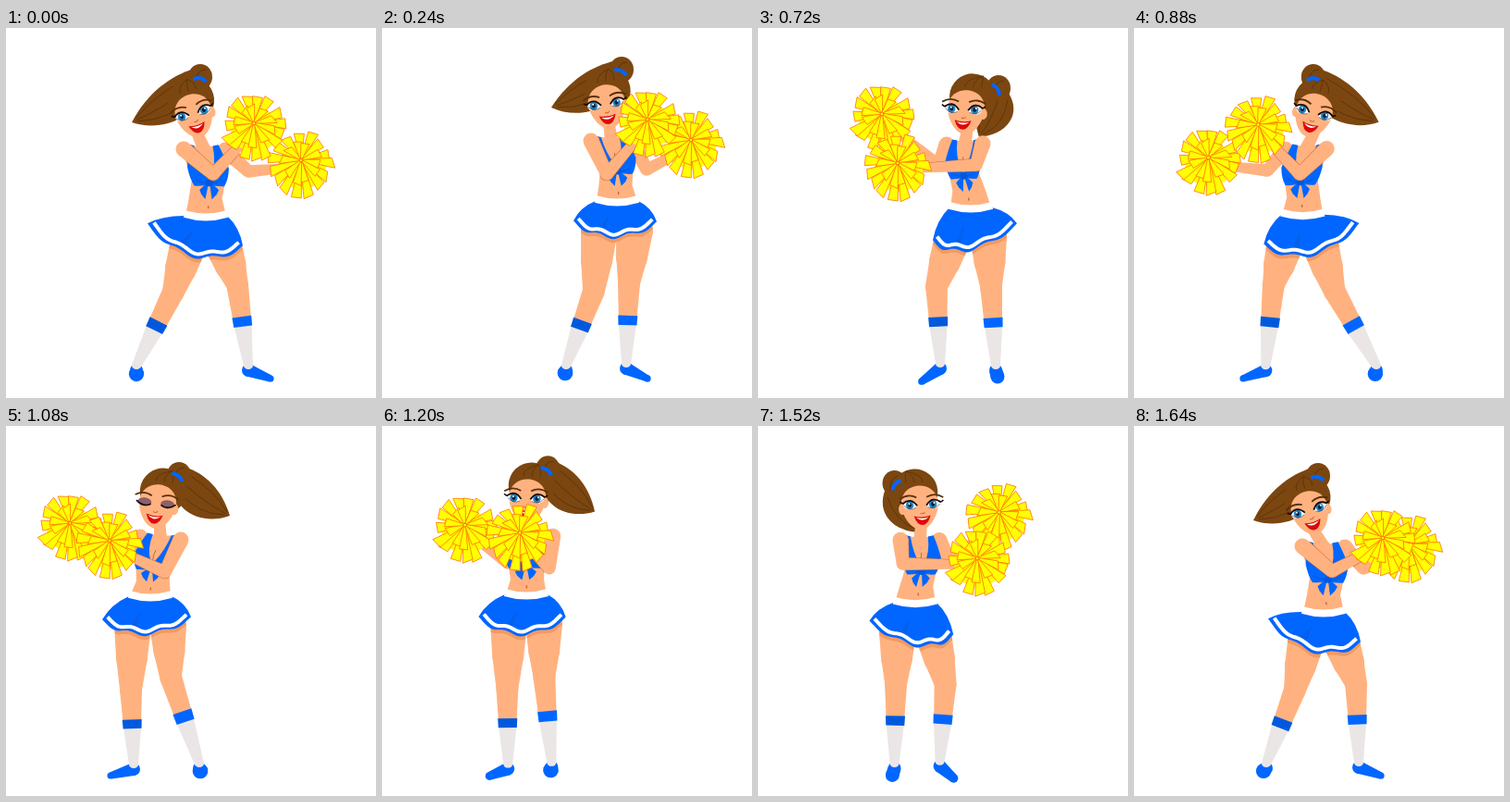
Write an HTML page with a canvas that moves like this. It is 400x400 px and loops after 1680 ms.

```html
<!DOCTYPE html>
<html lang="en">
<head>
<meta charset="utf-8">
<title>Cheerleader</title>
<style>
html, body { margin: 0; width: 100%; height: 100%; overflow: hidden; background: #fff; }
canvas { display: block; width: 100vw; height: 100vh; }
</style>
</head>
<body>
<canvas id="stage" width="400" height="400"></canvas>
<script>
const ctx = document.getElementById('stage').getContext('2d');
const LOOP = 1680, STEP = 40, MIRROR = 406;
const SKIN = '#ffb27f', SHADE = '#f29a62', LINE = '#c9683a', BLUE = '#0066ff', NAVY = '#0059dd';
const HAIR = '#7b4610', DARK_HAIR = '#58300a', SOCK = '#ebe6e6', YELLOW = '#ffff00', ORANGE = '#ff7000';
const keys = [];

// The second half of the dance mirrors the first, so a pose may serve twice.
function addPose(time, tilt, parts, mirrorTime) {
  keys.push({ time, parts: { ...parts, tilt: [tilt, 0] } });
  if (mirrorTime === undefined) return;
  const flipped = { tilt: [-tilt, 0] };
  for (const [name, [x, y]] of Object.entries(parts)) {
    flipped[name.replace(/[LR]$/, c => c === 'L' ? 'R' : 'L')] = [MIRROR - x, y];
  }
  keys.push({ time: mirrorTime, parts: flipped });
}

addPose(0, -17, {
  face: [203, 92], bun: [210, 53], tip: [136, 102], shL: [192, 131], shR: [237, 132],
  elL: [224, 158], elR: [262, 155], pomL: [269, 110], pomR: [320, 150],
  band: [216, 203], hemL: [153, 213], hemM: [204, 247], hemR: [256, 237],
  kneeL: [181, 285], kneeR: [250, 277], ankL: [141, 365], ankR: [262, 365], toeL: [141, 374], toeR: [286, 379]
}, 840);
addPose(240, -9, {
  face: [243, 82], bun: [259, 45], tip: [183, 86], shL: [226, 122], shR: [270, 122],
  elL: [243, 158], elR: [286, 153], pomL: [288, 106], pomR: [335, 128],
  band: [254, 187], hemL: [207, 210], hemM: [250, 226], hemR: [297, 211],
  kneeL: [229, 284], kneeR: [267, 276], ankL: [199, 365], ankR: [264, 363], toeL: [198, 373], toeR: [287, 379]
});
addPose(520, -3, {
  face: [255, 75], bun: [280, 55], tip: [230, 101], shL: [233, 118], shR: [286, 117],
  elL: [211, 152], elR: [284, 152], pomL: [192, 107], pomR: [255, 111],
  band: [259, 183], hemL: [215, 211], hemM: [258, 228], hemR: [303, 211],
  kneeL: [237, 280], kneeR: [270, 275], ankL: [241, 364], ankR: [263, 364], toeL: [245, 374], toeR: [280, 381]
});
addPose(720, 3, {
  face: [225, 88], bun: [260, 65], tip: [239, 118], shL: [204, 126], shR: [243, 125],
  elL: [195, 148], elR: [236, 148], pomL: [135, 100], pomR: [152, 153],
  band: [230, 194], hemL: [189, 231], hemM: [228, 240], hemR: [280, 213],
  kneeL: [193, 279], kneeR: [252, 279], ankL: [197, 363], ankR: [257, 365], toeL: [177, 382], toeR: [259, 377]
}, 1560);
addPose(1080, 7, {
  face: [164, 84], bun: [187, 53], tip: [242, 97], shL: [145, 120], shR: [189, 123],
  elL: [145, 142], elR: [172, 158], pomL: [70, 112], pomR: [113, 131],
  band: [156, 184], hemL: [104, 211], hemM: [150, 225], hemR: [200, 208],
  kneeL: [135, 285], kneeR: [178, 271], ankL: [138, 366], ankR: [209, 365], toeL: [113, 378], toeR: [210, 373]
});
addPose(1360, -2, {
  face: [153, 73], bun: [166, 36], tip: [212, 88], shL: [127, 119], shR: [182, 116],
  elL: [122, 157], elR: [200, 147], pomL: [150, 122], pomR: [228, 106],
  band: [156, 181], hemL: [106, 206], hemM: [150, 227], hemR: [198, 209],
  kneeL: [137, 280], kneeR: [174, 272], ankL: [135, 365], ankR: [163, 362], toeL: [126, 379], toeR: [160, 371]
});
addPose(1640, -17, {
  face: [190, 91], bun: [199, 54], tip: [129, 102], shL: [182, 130], shR: [228, 131],
  elL: [214, 157], elR: [248, 154], pomL: [270, 128], pomR: [298, 135],
  band: [205, 201], hemL: [145, 210], hemM: [195, 244], hemR: [245, 235],
  kneeL: [174, 285], kneeR: [240, 278], ankL: [143, 365], ankR: [243, 364], toeL: [140, 373], toeR: [267, 378]
}, 800);
keys.sort((a, b) => a.time - b.time);

// Smooth periodic interpolation that never overshoots a key.
function poseAt(time) {
  const n = keys.length;
  const key = i => keys[(i + n) % n];
  const when = i => key(i).time + Math.floor(i / n) * LOOP;
  let i = n - 1;
  while (keys[i].time > time) i--;
  const h = when(i + 1) - when(i), s = (time - when(i)) / h;
  const pose = {};
  for (const name of Object.keys(keys[0].parts)) {
    pose[name] = [0, 1].map(axis => {
      const value = j => key(j).parts[name][axis];
      const slope = j => (value(j + 1) - value(j)) / (when(j + 1) - when(j));
      const tangent = j => {
        const a = slope(j - 1), b = slope(j);
        return a * b <= 0 ? 0 : 2 * a * b / (a + b);
      };
      const a = value(i), d = value(i + 1) - a;
      return a + d * s * s * (3 - 2 * s)
        + h * s * (1 - s) * (tangent(i) * (1 - s) - tangent(i + 1) * s);
    });
  }
  return pose;
}

const mix = (a, b, k) => [a[0] + (b[0] - a[0]) * k, a[1] + (b[1] - a[1]) * k];
const shift = (p, x, y) => [p[0] + x, p[1] + y];
const distance = (a, b) => Math.hypot(b[0] - a[0], b[1] - a[1]);

function paint(fill, stroke, width = 1) {
  if (fill) { ctx.fillStyle = fill; ctx.fill(); }
  if (stroke) { ctx.strokeStyle = stroke; ctx.lineWidth = width; ctx.stroke(); }
}
function shape(points, fill, stroke, width) {
  ctx.beginPath();
  points.forEach(p => ctx.lineTo(...p));
  ctx.closePath();
  paint(fill, stroke, width);
}
function oval(x, y, rx, ry, fill, stroke, width) {
  ctx.beginPath();
  ctx.ellipse(x, y, rx, ry, 0, 0, 7);
  paint(fill, stroke, width);
}
function curve(x0, y0, cx, cy, x1, y1, color, width) {
  ctx.beginPath();
  ctx.moveTo(x0, y0);
  ctx.quadraticCurveTo(cx, cy, x1, y1);
  paint(null, color, width);
}
function taper(a, b, wa, wb, color) {
  const len = distance(a, b) || 1;
  const nx = (a[1] - b[1]) / len / 2, ny = (b[0] - a[0]) / len / 2;
  shape([shift(a, nx * wa, ny * wa), shift(b, nx * wb, ny * wb),
    shift(b, -nx * wb, -ny * wb), shift(a, -nx * wa, -ny * wa)], color);
}
function limb(points, widths, color) {
  points.forEach((p, i) => {
    oval(p[0], p[1], widths[i] / 2, widths[i] / 2, color);
    if (i) taper(points[i - 1], p, widths[i - 1], widths[i], color);
  });
}
// Draws only on top of what is already painted.
function inside(draw) {
  ctx.globalCompositeOperation = 'source-atop';
  draw();
  ctx.globalCompositeOperation = 'source-over';
}

function leg(p, side) {
  const hip = shift(p.band, side === 'L' ? -19 : 19, 32);
  const knee = p['knee' + side], ankle = p['ank' + side], toe = p['toe' + side];
  const heel = shift(ankle, 0, 5);
  const top = mix(knee, ankle, .4), cuff = mix(knee, ankle, .52);
  limb([hip, mix(hip, knee, .5), knee, top], [40, 34, 24, 20], SKIN);
  limb([heel, toe], [14, Math.max(7, 18 - distance(heel, toe) * .42)], BLUE);
  taper(cuff, ankle, 19, 10, SOCK);
  oval(ankle[0], ankle[1], 5, 4, SOCK);
  taper(top, cuff, 21, 20, side === 'L' ? NAVY : BLUE);
}

function hemLine(p, scale) {
  const { band, hemL, hemM, hemR } = p;
  const control = axis => 2 * hemM[axis] - (hemL[axis] + hemR[axis]) / 2;
  const hem = [];
  for (let i = 0; i <= 40; i++) {
    const k = i / 40, wave = Math.cos((k - .14) / .36 * Math.PI * 2) * 2.2;
    const [x, y] = [0, 1].map(a => (1 - k) ** 2 * hemL[a] + 2 * k * (1 - k) * control(a) + k * k * hemR[a]);
    hem.push(mix(band, [x, y + wave], scale));
  }
  return hem;
}
function skirt(p) {
  const { band } = p, hem = hemLine(p, 1), stripe = hemLine(p, .89);
  const left = shift(band, -23, 0), right = shift(band, 23, 0);
  const outline = () => {
    ctx.beginPath();
    ctx.moveTo(...left);
    ctx.quadraticCurveTo(...shift(mix(left, hem[0], .5), -5, -4), ...hem[0]);
    hem.forEach(q => ctx.lineTo(...q));
    ctx.quadraticCurveTo(...shift(mix(right, hem[40], .5), 5, -4), ...right);
    ctx.closePath();
  };
  ctx.save();
  ctx.translate(0, 4);
  inside(() => { outline(); paint(SHADE); });
  ctx.restore();
  outline();
  paint(BLUE);
  shape([mix(band, hem[13], .4), stripe[12], stripe[15]], '#075fea');
  ctx.beginPath();
  stripe.forEach(q => ctx.lineTo(...q));
  paint(null, '#fff', 4);
  curve(left[0], left[1] - 2, band[0], band[1] + 5, right[0], right[1] - 2, '#fff', 8);
}

function torso(p) {
  const { shL, shR, band, face } = p;
  const mid = mix(shL, shR, .5);
  const facing = (mix(p.pomL, p.pomR, .5)[0] - mid[0]) / 80;
  const at = (u, v) => {
    const width = u * (1 - v * .45);
    return shift(mix(mid, band, v), (shR[0] - shL[0]) * width + facing * 18 * v * (1 - v),
      (shR[1] - shL[1]) * width);
  };
  const smooth = (...points) => {
    ctx.beginPath();
    ctx.moveTo(...points[0]);
    for (let i = 1; i < points.length; i += 2) ctx.quadraticCurveTo(...points[i], ...points[i + 1]);
    ctx.closePath();
  };
  const waist = side => shift(mix(mid, band, .74), side * 18, 0);
  const hip = side => shift(band, side * 22, 0);
  limb([shift(face, 2, 18), mid], [12, 14], SKIN);
  smooth(shift(shL, 2, -6), mid, shift(shR, -2, -6), at(.62, .1), at(.5, .42),
    waist(1), waist(1), waist(1), hip(1), band, hip(-1), waist(-1), waist(-1),
    waist(-1), at(-.5, .42), at(-.62, .1), shift(shL, 2, -6));
  paint(SKIN);
  for (const side of [-1, 1]) {
    smooth(at(side * .36, -.08), at(side * .48, .12), at(side * .57, .28), at(side * .58, .45), at(side * .48, .55),
      at(side * .2, .56), at(0, .52), at(side * .02, .44), at(side * .07, .38), at(side * .24, .2), at(side * .22, -.06));
    paint(BLUE);
    shape([at(0, .47), at(side * .32, .61), at(side * .26, .68), at(side * .12, .75)], BLUE);
    curve(...at(side * .04, .5), ...at(side * .2, .52), ...at(side * .4, .46), NAVY, 1);
  }
  curve(...at(0, .2), ...at(-.04, .3), ...at(0, .39), LINE, 1);
  oval(...at(0, .5), 4, 4, NAVY);
  oval(...at(.03, .87), .8, 1.8, LINE);
}

function arm(p, side, near) {
  const elbow = p['el' + side];
  const joints = [p['sh' + side], elbow, mix(elbow, p['pom' + side], .75)];
  if (near) inside(() => limb(joints, [18, 14.5, 10.5], LINE));
  limb(joints, [17, 13.5, 9.5], SKIN);
}

function pom([x, y], seed) {
  const cx = x - 1, cy = y - 7;
  const noise = i => { const v = Math.sin(i * 78.23 + seed * 37.7) * 4375.5; return v - Math.floor(v); };
  oval(x, y, 26, 24, YELLOW);
  [[15, 34, 5.5], [10, 22, 4.6]].forEach(([count, reach, w], ring) => {
    for (let i = 0; i < count; i++) {
      const angle = (i + noise(i + ring * 40) * .5) / count * Math.PI * 2 + ring + seed;
      const len = reach * (.88 + noise(i * 3 + ring) * .18);
      const c = Math.cos(angle), s = Math.sin(angle);
      const end = [cx + c * len, cy + s * len * .9 + (1 + s) * len * .12];
      const slant = (noise(i + 90) - .5) * 4;
      const start = [cx + c * 2, cy + s * 2];
      shape([shift(start, s, -c), shift(end, s * w + c * slant, -c * w + s * slant),
        shift(end, -s * w - c * slant, c * w - s * slant), shift(start, -s, c)], YELLOW, ORANGE, .8);
    }
  });
}

function hairBack(p) {
  const { face, bun, tip } = p;
  const turn = Math.tanh((tip[0] - bun[0]) / 8);
  const len = distance(bun, tip);
  const nx = (bun[1] - tip[1]) / len * turn, ny = (tip[0] - bun[0]) / len * turn;
  const side = (k, w) => shift(mix(bun, tip, k), nx * w, ny * w);
  ctx.beginPath();
  ctx.moveTo(...side(0, -11));
  ctx.bezierCurveTo(...side(.3, -19), ...side(.65, -17), ...tip);
  ctx.bezierCurveTo(...side(.78, 26), ...side(.3, 36), ...side(0, 11));
  paint(HAIR);
  for (const w of [-7, 4, 14]) curve(...side(.15, w), ...side(.6, w * 1.5), ...side(.93, w * .2), DARK_HAIR, .8);
  oval(bun[0], bun[1], 13, 14, HAIR);
  curve(bun[0] - 5, bun[1] + 8, bun[0] - 5, bun[1] - 8, bun[0] + 6, bun[1] - 8, DARK_HAIR, .8);
}

function eye(side, closed) {
  ctx.save();
  ctx.translate(side * 12.5, 0);
  ctx.scale(side, 1);
  if (closed) {
    oval(0, -.5, 7.5, 4.5, '#8c6068');
    curve(-7, 1, 0, 6, 9, -1, '#170b08', 1.6);
  } else {
    oval(0, 0, 7.4, 4.9, '#fff');
    oval(-.5 * side, 0, 4.2, 4.6, '#2486c8');
    oval(-.5 * side, 0, 2, 2.4, '#09203a');
    oval(1, -1.5, 1, 1, '#fff');
    curve(-7.5, 1, -1, -9, 8, -2, '#170b08', 1.8);
    curve(7, -2, 9, -2, 11, -4, '#170b08', 1.6);
    curve(-6, 3, 1, 7, 7, 0, '#4a2417', .6);
  }
  curve(-7, -8, 2, -13, 11, -7, DARK_HAIR, 1.8);
  ctx.restore();
}

function head(p, closed) {
  const { face, bun, tilt } = p;
  const lean = bun[0] - face[0], back = lean * .18;
  ctx.save();
  ctx.translate(...face);
  ctx.rotate(tilt[0] * Math.PI / 180);
  oval(back, -14, 25, 25, HAIR);
  oval(Math.sign(lean) * 19, 4, 4, 6, SKIN);
  ctx.beginPath();
  ctx.moveTo(-20, -2);
  ctx.bezierCurveTo(-19, -27, 19, -27, 20, -2);
  ctx.bezierCurveTo(20, 12, 10, 27, 0, 27);
  ctx.bezierCurveTo(-10, 27, -20, 12, -20, -2);
  paint(SKIN);
  for (const x of [-10, 0, 10]) curve(x * .9 + back, -24, x + back, -32, back + lean * .3, -37, DARK_HAIR, .7);
  ctx.translate(-lean * .08, 0);
  eye(-1, closed);
  eye(1, closed);
  curve(-2, 9, 1, 11, 3, 8, LINE, 1);
  ctx.beginPath();
  ctx.moveTo(-9, 12);
  ctx.quadraticCurveTo(0, 15, 9, 12);
  ctx.quadraticCurveTo(6, 22, 0, 22);
  ctx.quadraticCurveTo(-6, 22, -9, 12);
  paint('#df0808');
  ctx.beginPath();
  ctx.moveTo(-7, 13.5);
  ctx.quadraticCurveTo(0, 16, 7, 13.5);
  ctx.quadraticCurveTo(0, 20, -7, 13.5);
  paint('#fff');
  ctx.restore();

  const tie = mix(face, bun, .91), len = distance(face, bun);
  const nx = (face[1] - bun[1]) / len * 7, ny = (bun[0] - face[0]) / len * 7;
  curve(tie[0] - nx, tie[1] - ny, ...mix(face, bun, 1.03), tie[0] + nx, tie[1] + ny, BLUE, 4);
}

function draw(now) {
  const time = Math.floor((now % LOOP) / STEP) * STEP;
  const p = poseAt(time);
  const near = time >= 400 && time < 1240 ? 'R' : 'L', far = near === 'R' ? 'L' : 'R';
  ctx.clearRect(0, 0, 400, 400);
  ctx.lineJoin = 'round';
  hairBack(p);
  leg(p, 'L');
  leg(p, 'R');
  arm(p, far, false);
  torso(p);
  skirt(p);
  head(p, time >= 1000 && time < 1160);
  arm(p, near, true);
  pom(p['pom' + far], far === 'L' ? 1 : 2);
  pom(p['pom' + near], near === 'L' ? 1 : 2);
  requestAnimationFrame(draw);
}
requestAnimationFrame(draw);
</script>
</body>
</html>
```
